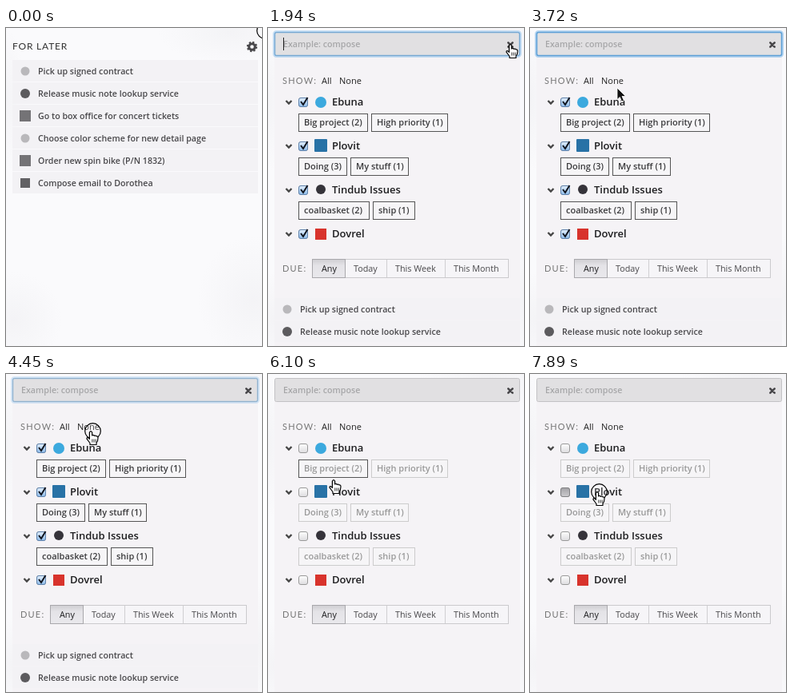
An HTML page for the animation above (8 s loop, 320 by 398 pixels).

```html
<!DOCTYPE html>
<html lang="en">
<head>
<meta charset="utf-8">
<title>Filter panel</title>
<style>
html, body { margin: 0; width: 100%; height: 100%; overflow: hidden; background: #fafafc; }
svg { display: block; width: 320px; height: 398px; }
text { font: 600 10.65px "Open Sans", sans-serif; fill: #48474a; white-space: pre; }
.cap { font: 400 11px Lato, sans-serif; letter-spacing: 1.2px; fill: #777; }
.title { font-size: 12px; letter-spacing: .8px; fill: #333; }
.link { font-size: 11px; font-weight: 400; fill: #222; }
.head { font-size: 13px; fill: #1d1d1f; }
.chip text { font-size: 11px; fill: #999; }
.chip rect { fill: #f6f5f7; stroke: #ccc; }
.on .chip text { fill: #3a3a3c; }
.on .chip rect { stroke: #555; }
.due { font-size: 10.8px; font-weight: 400; fill: #48474a; }
.picked { fill: #1d1d1f; }
.hint { font-size: 10.7px; fill: #a6a6a8; }

.list, .panel, .on, .glow, .caret, .cursor, .hand, .arrow, .ring, .hover1, .hover2, .press {
  animation: 8s step-end -4ms infinite;
}
.list { animation-name: list; }
.panel { animation-name: panel; }
.on { animation-name: on; }
.glow { animation-name: glow; }
.caret { animation-name: caret; }
.cursor { animation-name: move; }
.hand { animation-name: hand; }
.arrow { animation-name: arrow; }
.ring { animation-name: ring; }
.hover1 { animation-name: hover1; }
.hover2 { animation-name: hover2; }
.press { animation-name: press; }

@keyframes list { 0% { opacity: 1 } 24.25%, 100% { opacity: 0 } }
@keyframes panel { 0% { opacity: 0 } 24.25%, 100% { opacity: 1 } }
@keyframes on { 0% { opacity: 1 } 57.5% { opacity: .35 } 59.375%, 100% { opacity: 0 } }
@keyframes glow { 0% { opacity: .75 } 26.125% { opacity: 1 } 53.875% { opacity: .5 } 55.75%, 100% { opacity: 0 } }
@keyframes caret {
  0%, 35.5%, 48.375% { opacity: 1 }
  29.875%, 41%, 53.875%, 100% { opacity: 0 }
}
@keyframes hand {
  0%, 39.125% { opacity: 0 }
  11.125%, 50.25%, 100% { opacity: 1 }
}
@keyframes arrow {
  0%, 39.125% { opacity: 1 }
  11.125%, 50.25%, 100% { opacity: 0 }
}
@keyframes ring {
  0%, 20.5%, 53.875%, 98.625%, 100% { opacity: 1 }
  1.875%, 24.25%, 57.5% { opacity: 0 }
}
@keyframes hover1 { 0%, 78.125%, 100% { opacity: 0 } 74.375% { opacity: 1 } }
@keyframes hover2 { 0%, 87.5%, 100% { opacity: 0 } 80% { opacity: 1 } }
@keyframes press { 0% { opacity: 0 } 98.625%, 100% { opacity: 1 } }
/* Whole pixels keep the cursor crisp */
@keyframes move {
  0% { transform: translate(323px, 3px) }
  1.875% { transform: translate(318px, 9px) }
  3.75% { transform: translate(314px, 14px) }
  5.625% { transform: translate(310px, 19px) }
  7.5% { transform: translate(307px, 21px) }
  9.375% { transform: translate(305px, 21px) }
  11.125% { transform: translate(305px, 20px) }
  13% { transform: translate(304px, 18px) }
  24.25% { transform: translate(305px, 20px) }
  39.125% { transform: translate(284px, 32px) }
  41% { transform: translate(222px, 56px) }
  42.875% { transform: translate(158px, 76px) }
  44.625% { transform: translate(120px, 82px) }
  46.5% { transform: translate(109px, 75px) }
  48.375% { transform: translate(109px, 73px) }
  50.25% { transform: translate(108px, 72px) }
  52% { transform: translate(108px, 71px) }
  72.5% { transform: translate(102px, 87px) }
  74.375% { transform: translate(92px, 110px) }
  76.25% { transform: translate(84px, 132px) }
  78.125% { transform: translate(84px, 150px) }
  80% { transform: translate(85px, 164px) }
  81.875% { transform: translate(86px, 170px) }
  83.75% { transform: translate(86px, 167px) }
  85.625% { transform: translate(86px, 164px) }
  87.5% { transform: translate(86px, 154px) }
  89.25%, 100% { transform: translate(86px, 147px) }
}
</style>
</head>
<body>
<svg id="stage" viewBox="0 0 320 398" xmlns="http://www.w3.org/2000/svg"></svg>
<script>
const text = (x, y, s, cls = '') => `<text class="${cls}" x="${x}" y="${y}">${s}</text>`;
const box = (x, y, w, h, attrs) => `<rect x="${x}" y="${y}" width="${w}" height="${h}" ${attrs}/>`;
const dot = (x, y, r, color) => `<circle cx="${x}" cy="${y}" r="${r}" fill="${color}"/>`;
const group = (cls, ...parts) => `<g class="${cls}">${parts.join('')}</g>`;
const fade = (id, ...colors) => `<linearGradient id="${id}" x2="0" y2="1">` +
  colors.map((c, i) => `<stop offset="${i / (colors.length - 1)}" stop-color="${c}"/>`).join('') +
  '</linearGradient>';

const grayMarks = {
  round: y => dot(24, y, 5.5, '#b9b8bb'),
  dark: y => dot(24, y, 6, '#5c5b5e'),
  board: y => box(17, y - 7, 14, 14, 'fill="#747376"'),
  mail: y => box(18, y - 6, 12, 12, 'fill="#626164"')
};

const tasks = [
  ['round', 'Pick up signed contract'],
  ['dark', 'Release music note lookup service'],
  ['board', 'Go to box office for concert tickets'],
  ['round', 'Choose color scheme for new detail page'],
  ['board', 'Order new spin bike (P/N 1832)'],
  ['mail', 'Compose email to Dorothea']
];

const row = ([mark, label], y) =>
  box(8, y - 14, 307, 27, 'fill="#f3f2f5"') + grayMarks[mark](y) + text(40, y + 4, label);

// Each chip: label, left edge, width
const sections = [
  ['Ebuna', dot(66, 93, 7, '#3ca9de'), [['Big project (2)', 38, 87], ['High priority (1)', 129, 96]]],
  ['Plovit', box(58, 139, 16, 16, 'rx="1" fill="#2872a6"'), [['Doing (3)', 38, 61], ['My stuff (1)', 103, 73]]],
  ['Tindub Issues', dot(66, 202, 6, '#35333a'), [['coalbasket (2)', 38, 89], ['ship (1)', 131, 53]]],
  ['Dovrel', box(59, 251, 14, 14, 'fill="#d8332c"'), []]
];
const sectionY = i => 93 + 55 * i;

const chips = i => sections[i][2].map(([label, x, w]) => group('chip',
  box(x + .5, sectionY(i) + 14.5, w - 1, 22, ''),
  text(x + 7, sectionY(i) + 29, label))).join('');

const checkbox = (y, fill, stroke) =>
  box(38.5, y - 5.5, 11, 11, `rx="2.5" fill="${fill}" stroke="${stroke}"`);

const section = ([name, mark], i) => {
  const y = sectionY(i);
  return `<path d="M22.5 ${y - 2}l3.5 3.5 3.5-3.5" fill="none" stroke="#444" stroke-width="2.3"/>` +
    checkbox(y, 'url(#plain)', '#999') + mark + text(80, y + 4, name, 'head') + chips(i);
};

const checked = (_, i) => {
  const y = sectionY(i);
  return checkbox(y, 'url(#blue)', '#5f82ac') +
    `<path d="M41 ${y - 1}l3 4 5.5-9" fill="none" stroke="#10151f" stroke-width="2"/>` + chips(i);
};

const gear = `<g fill="none" stroke="#48474a">
  <circle cx="307.5" cy="23.5" r="3.8" stroke-width="3"/>
  <circle cx="307.5" cy="23.5" r="5.6" stroke-width="2.2" stroke-dasharray="2.2 2.2"/></g>`;

const field = box(8.5, 5.5, 306, 29, 'rx="2" fill="#e1e0e2" stroke="#c3c2c5"') +
  group('glow',
    box(7.5, 4.5, 308, 31, 'rx="3" fill="none" stroke="#8fc0ea" stroke-width="3" opacity=".65"'),
    box(8.5, 5.5, 306, 29, 'rx="2" fill="none" stroke="#5c9fd6" stroke-width="1.5"')) +
  text(19, 24, 'Example: compose', 'hint') +
  box(19, 12, 1, 16, 'class="caret" fill="#222"') +
  '<path d="M300.3 18.3l5.4 5.4m0-5.4l-5.4 5.4" stroke="#48474a" stroke-width="2.6" stroke-linecap="round"/>';

const dueBar = box(55.5, 289.5, 245, 23, 'fill="#f6f5f8" stroke="#cbcacd"') +
  box(55.5, 289.5, 41, 23, 'fill="url(#pressed)" stroke="#a9a8ac"') +
  '<path d="M148.5 290v22M221.5 290v22" stroke="#d0cfd2"/>' +
  text(67, 305, 'Any', 'due picked') +
  [[107, 'Today'], [159, 'This Week'], [232, 'This Month']]
    .map(([x, s]) => text(x, 305, s, 'due')).join('');

const cursor = group('cursor',
  `<circle class="ring" cx=".5" cy=".5" r="9.8" fill="#fff" fill-opacity=".15" stroke="#000" stroke-width="1.2"/>`,
  `<path class="arrow" d="M0 0V14.5L3.3 11.5 5.7 17 8.4 15.8 6 10.5H10.5Z" fill="#111" stroke="#fff" stroke-width=".8"/>`,
  `<g class="hand" stroke="#000" stroke-linejoin="round">
    <path d="M-3.6 2Q-2 -.8 -.4 2V6Q1.2 4.8 2.4 6.4 4 5.4 5 7 6.8 6.4 7 9L6.4 13 5 15V17.5H-3V15.5L-7 10.2Q-7.2 8 -5.2 8.8L-3.6 10.4Z" fill="#fff" stroke-width="1.2"/>
    <path d="M-.2 10.5v4M2 10.5v4M4.2 10.5v4" stroke-width=".8"/></g>`);

document.getElementById('stage').innerHTML = '<defs>' +
  fade('plain', '#fdfdfd', '#dedde0') +
  fade('blue', '#e3effb', '#8dbbea') +
  fade('dim', '#a3a2a6', '#cccbce') +
  fade('pressed', '#cfced2', '#e4e3e7', '#e7e6ea', '#e9e8ec') +
  `<radialGradient id="haze"><stop stop-color="#dddce0" stop-opacity=".22"/>
    <stop offset="1" stop-color="#dddce0" stop-opacity="0"/></radialGradient></defs>` +
  box(0, 0, 320, 398, 'fill="#fafafc"') +
  [[10, 365, 60, 60], [310, 340, 70, 80], [280, 5, 90, 40], [0, 90, 25, 90]]
    .map(([x, y, rx, ry]) => `<ellipse cx="${x}" cy="${y}" rx="${rx}" ry="${ry}" fill="url(#haze)"/>`).join('') +
  group('list',
    text(8, 27, 'FOR LATER', 'cap title'), gear,
    ...tasks.map((t, i) => row(t, 54 + 28 * i))) +
  group('panel',
    box(8, 34, 307, 364, 'fill="#f5f3f6"'),
    field,
    text(18, 70, 'SHOW:', 'cap'), text(67, 70, 'All', 'link'), text(89, 70, 'None', 'link'),
    ...sections.map(section),
    text(18, 305, 'DUE:', 'cap'), dueBar,
    group('on',
      ...sections.map(checked),
      ...tasks.slice(0, 2).map((t, i) => row(t, 352 + 28 * i))),
    box(38.5, 107.5, 86, 22, 'class="hover1" fill="none" stroke="#555"'),
    box(38.5, 162.5, 60, 22, 'class="hover2" fill="none" stroke="#555"'),
    group('press', checkbox(148, 'url(#dim)', '#808083'))) +
  cursor;
</script>
</body>
</html>
```
